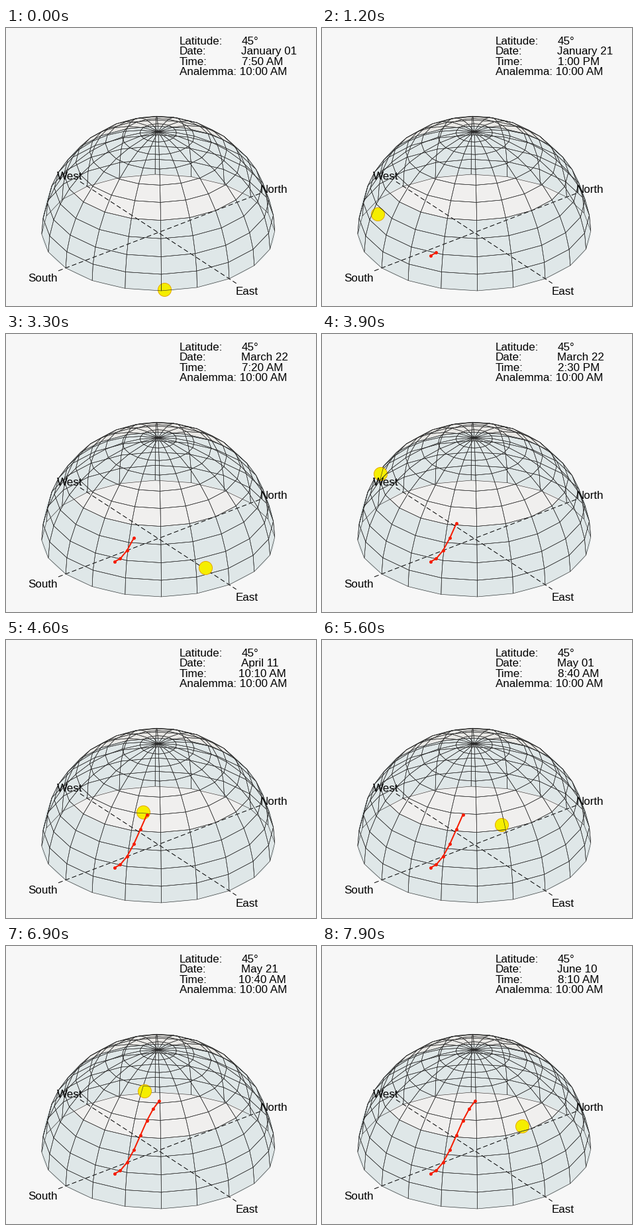
Recreate the animation shown at these times as a matplotlib script. Size 468x420 px, loop 8 s.

```python
import numpy as np
import matplotlib.pyplot as plt
from matplotlib.animation import FuncAnimation
from matplotlib.collections import PolyCollection
from matplotlib.patches import Polygon

W, H, DPI = 468, 420, 100
PT = 72 / DPI                       # points per pixel
CENTER, R = np.array([229.8, 309.0]), 176
AZ, EL = np.radians([-37.5, 30])
LAT = np.radians(45)
FRAMES, INTERVAL = 80, 100
BLUE, PALE, WARM = "#dfe7e8", "#f0efee", "#e9e8e5"

# One row per day: first frame, first time and step, in units of ten minutes
DAYS = [(0, 47, 7), (8, 50, 7), (15, 44, 7.5), (23, 41, 7.33), (32, 37, 7.2),
        (42, 33, 7.1), (53, 30, 7.4), (64, 28, 7.3), (76, 26, 7.7)]
DATES = ["January 01", "January 21", "February 10", "March 02", "March 22",
         "April 11", "May 01", "May 21", "June 10"]
DAY_STEP, MARK_TIME = 20, 60


def project(p):
    """Orthographic view of (north, west, up) points: pixels and depth."""
    x, y, z = np.moveaxis(np.asarray(p, float), -1, 0)
    right = x * np.cos(AZ) + y * np.sin(AZ)
    away = -x * np.sin(AZ) + y * np.cos(AZ)
    up = away * np.sin(EL) + z * np.cos(EL)
    depth = z * np.sin(EL) - away * np.cos(EL)
    return CENTER + R * np.stack([right, -up], -1), depth


def sphere(lon, lat):
    lon, lat = np.broadcast_arrays(lon, lat)
    return np.stack([np.cos(lat) * np.cos(lon), np.cos(lat) * np.sin(lon), np.sin(lat)], -1)


def sun_vector(day, minutes):
    """Sun direction at LAT for days since January 1 and clock minutes."""
    n = 360 / 365.24
    orbit = n * (day + 10) + 1.914 * np.sin(np.radians(n * (day - 2)))
    dec = -np.arcsin(0.39779 * np.cos(np.radians(orbit)))
    b = 2 * np.pi * (day - 80) / 365
    eot = 9.87 * np.sin(2 * b) - 7.53 * np.cos(b) - 1.5 * np.sin(b)
    h = np.radians((minutes + eot - 720) / 4)
    north = np.cos(LAT) * np.sin(dec) - np.sin(LAT) * np.cos(dec) * np.cos(h)
    west = np.cos(dec) * np.sin(h)
    up = np.sin(LAT) * np.sin(dec) + np.cos(LAT) * np.cos(dec) * np.cos(h)
    return np.array([north, west, up])


def arc(a, b, rx, ry, cy=0.0):
    """Ellipse arc in dome units, angles in degrees, y upwards."""
    t = np.radians(np.linspace(a, b, 80))
    return CENTER + R * np.column_stack([rx * np.cos(t), -cy - ry * np.sin(t)])


def clock(t):
    hour, minute = divmod(int(t) * 10, 60)
    return f"{(hour - 1) % 12 + 1}:{minute:02d} {'AM' if hour < 12 else 'PM'}"


plt.rcParams["font.family"] = "Liberation Sans"
fig = plt.figure(figsize=(W / DPI, H / DPI), dpi=DPI, facecolor="#f7f7f7")
ax = fig.add_axes([0, 0, 1, 1])
ax.set(xlim=(0, W), ylim=(H, 0))
ax.axis("off")


def fill(parts, color, z):
    ax.add_patch(Polygon(np.vstack(parts), fc=color, ec="none", zorder=z))


def label(x, y, s, **kw):
    return ax.text(x, y, s, size=17 * PT, color="black", va="baseline", zorder=9, **kw)


# Dome shading: body, floor seen through the upper shell, upper back
ring = np.radians(36)
rx, cy = np.cos(ring), np.sin(ring) * np.cos(EL)
ry = rx * np.sin(EL)
fill([arc(0, 180, 1, 1), arc(180, 360, 1, np.sin(EL))], BLUE, 1)
fill([arc(137, 43, 1, np.sin(EL)), arc(-25, -155, rx, ry, cy)], PALE, 1.1)
edge = np.degrees(np.arcsin(np.sin(ring) / np.cos(EL)))
side = np.degrees(np.arccos(np.cos(np.radians(edge)) / rx))
fill([arc(edge, 180 - edge, 1, 1), arc(180 - side, side, rx, ry, cy)], WARM, 1.2)

# Compass axes
for a, b, v in (("North", "South", (1, 0, 0)), ("West", "East", (0, 1, 0))):
    v = np.array(v)
    ends, _ = project([1.1 * v, -1.1 * v])
    ax.plot(*ends.T, color="black", lw=PT, dashes=(7, 4), zorder=2)
    for name, sign in ((a, 1), (b, -1)):
        (x, y), _ = project(1.25 * sign * v)
        label(x, y + 7, name, ha="center")

# Mesh faces, split each time into those behind and those before the sun
lon = np.radians(np.arange(-180, 181, 18))
lat = np.radians(np.arange(0, 91, 9))
grid = sphere(lon[None, :], lat[:, None])
corners = np.stack([grid[:-1, :-1], grid[:-1, 1:], grid[1:, 1:], grid[1:, :-1]], 2)
faces, depths = project(corners.reshape(-1, 4, 3))
depths = depths.mean(axis=1)


def mesh(z):
    c = PolyCollection([], facecolors="none", edgecolors="#2b2b2b", linewidths=0.6 * PT, zorder=z)
    return ax.add_collection(c, autolim=False)


far, near = mesh(3), mesh(5)
sun, = ax.plot([], [], "o", ms=20 * PT, mfc="#f5ee00", mec="#e6a800", mew=PT, zorder=4)
trail, = ax.plot([], [], "o-", color="#f51c00", lw=2 * PT, ms=5 * PT, mew=0, zorder=6)
marks, _ = project([sun_vector(d * DAY_STEP, MARK_TIME * 10) for d in range(len(DAYS))])

for y, s in ((25, "Latitude:"), (40, "Date:"), (56, "Time:"), (71, "Analemma: 10:00 AM")):
    label(261.5, y, s)
label(356, 25, "45°")
date_text = label(355.2, 40, "")
time_text = label(351, 56, "")


def draw(i):
    day = max(d for d, row in enumerate(DAYS) if row[0] <= i)
    start, first, step = DAYS[day]
    t = int(first + step * (i - start))

    pos, depth = project(sun_vector(day * DAY_STEP, t * 10))
    sun.set_data([pos[0]], [pos[1]])
    far.set_verts(faces[depths <= depth])
    near.set_verts(faces[depths > depth])
    trail.set_data(*marks[:day + (t >= MARK_TIME)].T)

    s = clock(t)
    date_text.set_text(DATES[day])
    time_text.set_text(s)
    time_text.set_x(351 if len(s) == 8 else 355.7)
    return far, near, sun, trail, date_text, time_text


anim = FuncAnimation(fig, draw, frames=FRAMES, interval=INTERVAL, repeat=True, blit=False)
plt.show()
```
